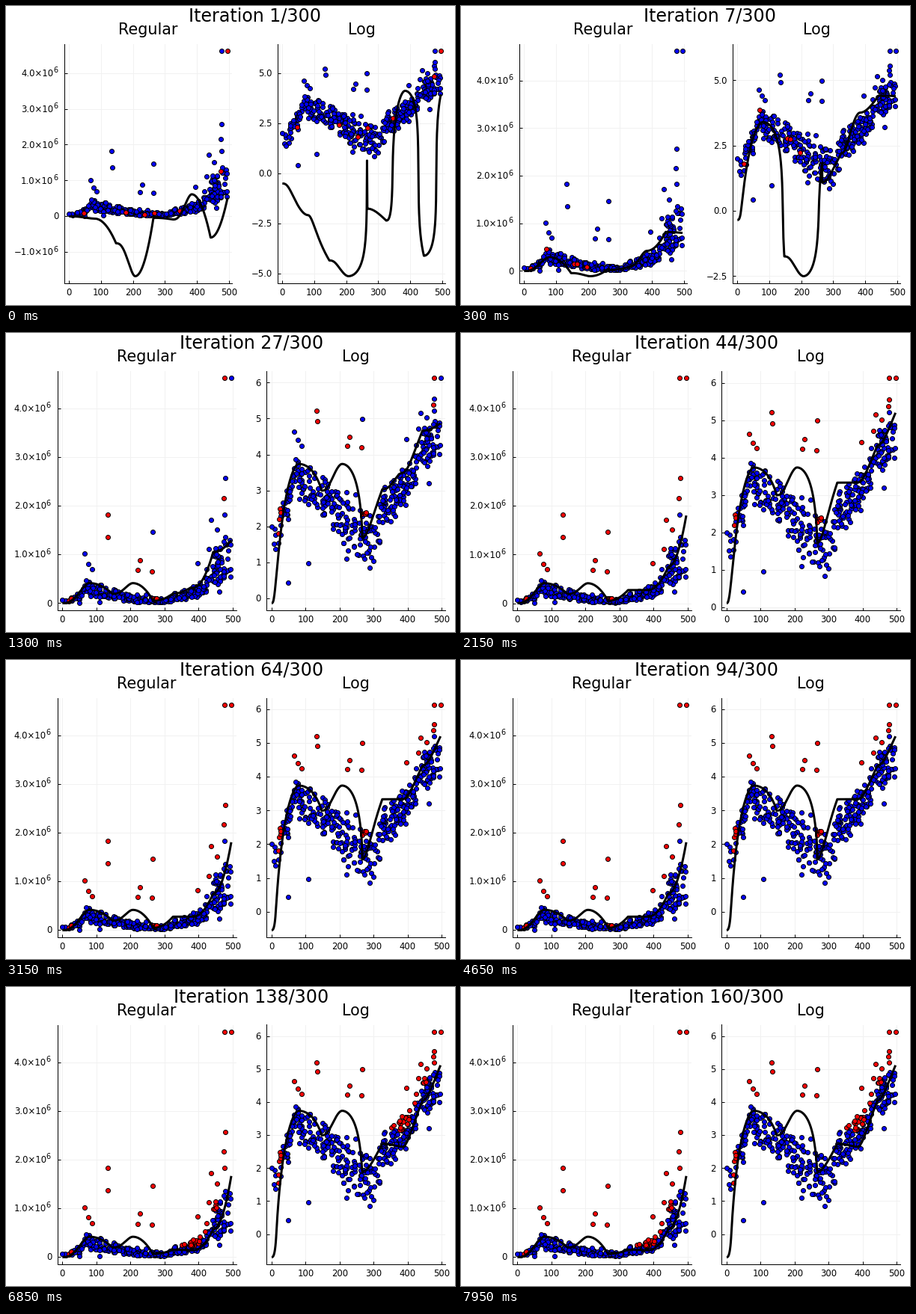
A matplotlib script for the animation above (8000 ms loop, 600x400 px).

```python
import numpy as np
import matplotlib.pyplot as plt
from matplotlib.animation import FuncAnimation

W, H, FRAMES = 600, 400, 160
PX = 0.72                     # points per pixel at 100 dpi
TOP, BOTTOM = 50.5, 370.5
X_END = 496

plt.rcParams["font.family"] = "DejaVu Sans"
rng = np.random.default_rng(4)


def to_log(y):
    return np.sign(y) * np.log1p(np.abs(y) / 1e4)


def from_log(v):
    return np.sign(v) * np.expm1(np.abs(v)) * 1e4


# --- fitted curve: two pieces, knots 1/4 apart, eased between ---------------
def quad(t):
    return t * t


def swing(t):
    u = t ** 1.35
    return u * u * (3 - 2 * u)


LEFT_X, RIGHT_X = [0, 80, 147, 207, 265], [266, 325, 384, 443, X_END]
LEFT_EASE, RIGHT_EASE = [swing, quad] * 2, [quad, swing, quad, quad]
CURVE_X = np.concatenate([np.linspace(0, 265, 266), np.linspace(266, X_END, 231)])

# knot heights in millions, held or blended between key frames
HUMPS = [.41, .19, .41, .067]
FLAT = [.046, .27, .27, .75, 1.8]
LATE = [.057, .144, .131, .564, 1.66]
KEYS = [
    (0, [-.0065, -.07, -.76, -1.68, .009, -.048, -.095, .61, -.6, .51]),
    (8, [-.0035, *HUMPS, .042, .139, .356, 1.29, .89]),
    (18, [-.0035, *HUMPS, .042, .139, .356, 1.29, .89]),
    (36, [.0012, *HUMPS, *FLAT]),
    (46, [.0012, *HUMPS, *FLAT]),
    (51, [-.0073, *HUMPS, .037, *FLAT[1:]]),
    (96, [-.0073, *HUMPS, .037, *FLAT[1:]]),
    (101, [-.0035, *HUMPS, *LATE]),
    (122, [-.0035, *HUMPS, *LATE]),
    (130, [-.0101, *HUMPS, *LATE]),
]
KEY_N = [n for n, _ in KEYS]
KEY_Y = np.array([y for _, y in KEYS]) * 1e6


def piece(xk, yk, eases):
    x = CURVE_X[(CURVE_X >= xk[0]) & (CURVE_X <= xk[-1])]
    y = np.full(len(x), yk[0])
    for x0, x1, y0, y1, ease in zip(xk, xk[1:], yk, yk[1:], eases):
        part = x >= x0
        y[part] = y0 + (y1 - y0) * ease(np.clip((x[part] - x0) / (x1 - x0), 0, 1))
    return y


def curve_at(n):
    knots = [np.interp(n, KEY_N, column) for column in KEY_Y.T]
    return np.concatenate([piece(LEFT_X, knots[:5], LEFT_EASE),
                           piece(RIGHT_X, knots[5:], RIGHT_EASE)])


# --- data points: a noisy band and some stray values, in log units ----------
BAND = [(0, 1.2), (70, 3.4), (150, 2.9), (300, 1.5), (325, 2.5), (400, 3.15),
        (440, 4.15), (X_END, 4.45)]
STRAYS = [(0, 2), (49, .43), (108, .97), (219, 1.1), (461, 3.2), (66, 4.63),
          (76, 4.4), (87, 4.25), (133, 5.21), (134, 4.92), (222, 4.23),
          (228, 4.49), (264, 4.2), (265, 4.99), (396, 4.42), (430, 4.72),
          (437, 5.15), (454, 5.02), (474, 5.38), (476, 5.21), (478, 5.55),
          (477, 6.14), (X_END, 6.14)]

band_x = np.round(np.concatenate([rng.uniform(2, 50, 28), rng.uniform(50, 495, 365)]))
half = .6 + .35 * np.exp(-((band_x - 240) / 60) ** 2)
band_v = np.interp(band_x, *zip(*BAND)) + half * (2 * rng.beta(1.6, 1.6, len(band_x)) - 1)

stray_x, stray_v = np.array(STRAYS).T
px = np.concatenate([band_x, stray_x])
pv = np.concatenate([band_v, stray_v])
py = from_log(pv)
first_guess = np.append(rng.choice(len(band_x), 7), len(px) - 1)
since = rng.uniform(4, 34, len(px))


def red_mask(n, c):
    """A few random points at first, later whatever lies well above the curve."""
    if n < 5:
        return np.isin(np.arange(len(px)), first_guess)
    above = pv - np.interp(px, CURVE_X, c)
    return (above > .5) & (px > 15) & (since <= n)


# --- stage ------------------------------------------------------------------
fig = plt.figure(figsize=(W / 100, H / 100), dpi=100, facecolor="white")


class Panel:
    def __init__(self, title):
        ax = self.ax = fig.add_axes([.1, .1, .3, .8])
        ax.set_xlim(-.03 * X_END, 1.03 * X_END)
        ax.set_axisbelow(True)
        ax.grid(color="#f1f1f1", lw=PX)
        ax.spines[["top", "right"]].set_visible(False)
        ax.spines[["left", "bottom"]].set_linewidth(PX)
        ax.tick_params(direction="in", length=4 * PX, width=PX,
                       labelleft=False, labelbottom=False)
        ax.set_xticks(range(0, 501, 100))
        dot = dict(ls="", marker="o", ms=6 * PX, mec="black", mew=PX, clip_on=False)
        self.blue, = ax.plot([], [], mfc="#0000ff", zorder=3, **dot)
        self.red, = ax.plot([], [], mfc="#ff0000", zorder=4, **dot)
        self.line, = ax.plot([], [], color="black", lw=3 * PX, zorder=5,
                             solid_joinstyle="round", solid_capstyle="butt")
        for v in range(0, 501, 100):
            self.note(str(v), (v, 0), ("data", "axes fraction"), (0, -16.2), "center")
        side = ("axes fraction", "data")
        self.main = [self.note("", (0, 0), side, (0, 0), "right") for _ in range(8)]
        self.exp = [self.note("", (0, 0), side, (-14.8, .4), "left", 9.8)
                    for _ in range(8)]
        self.title = fig.text(0, 1 - 38 / H, title, ha="center", va="baseline",
                              fontsize=20.6 * PX)

    def note(self, s, xy, coords, shift, ha, size=11.65):
        return self.ax.annotate(s, xy, xycoords=coords, xytext=shift,
                                textcoords="offset pixels", ha=ha, va="baseline",
                                fontsize=size * PX, annotation_clip=False)

    def place(self, x, w):
        self.ax.set_position([x / W, 1 - BOTTOM / H, w / W, (BOTTOM - TOP) / H])
        self.title.set_x((x + w / 2) / W)

    def show(self, y, c, red, step, fmt, power=""):
        lo, hi = min(y.min(), c.min()), max(y.max(), c.max())
        pad = .03 * (hi - lo)
        lo, hi = lo - pad, hi + pad
        self.ax.set_ylim(lo, hi)
        ticks = np.arange(np.ceil(lo / step), np.floor(hi / step) + 1) * step
        self.ax.set_yticks(ticks)
        for label in self.main + self.exp:
            label.set_text("")
        for v, m, e in zip(ticks, self.main, self.exp):
            m.xy = e.xy = (0, v)
            raised = power if v else ""
            m.set_text(fmt(v).replace("-", "\u2212"))
            m.set_position((-14.7 if raised else -7.3, -4.3))
            e.set_text(raised)
        self.blue.set_data(px[~red], y[~red])
        self.red.set_data(px[red], y[red])
        self.line.set_data(CURVE_X, c)


regular, log = Panel("Regular"), Panel("Log")
heading = fig.text(.5, 1 - 20.6 / H, "", ha="center", va="baseline",
                   fontsize=23.8 * PX)


def millions(v):
    return f"{v / 1e6:.1f}×10" if v else "0"


def draw(n):
    y = curve_at(n)
    v = to_log(y)
    red = red_mask(n, v)
    wide = v.min() < -2
    left, right, w = (78, 363, 224.4) if wide else (68.6, 348.2, 239.2)
    regular.place(left, w)
    log.place(right, w)
    regular.show(py, y, red, 1e6, millions, "6")
    digits = 1 if wide else 0
    log.show(pv, v, red, 2.5 if wide else 1, lambda t: f"{t + 0:.{digits}f}")
    heading.set_text(f"Iteration {n + 1}/300")
    heading.set_x((left + right + w) / 2 / W)
    return []


anim = FuncAnimation(fig, draw, frames=FRAMES, interval=50, init_func=lambda: draw(0),
                     repeat=True, repeat_delay=0, blit=False)
plt.show()
```
